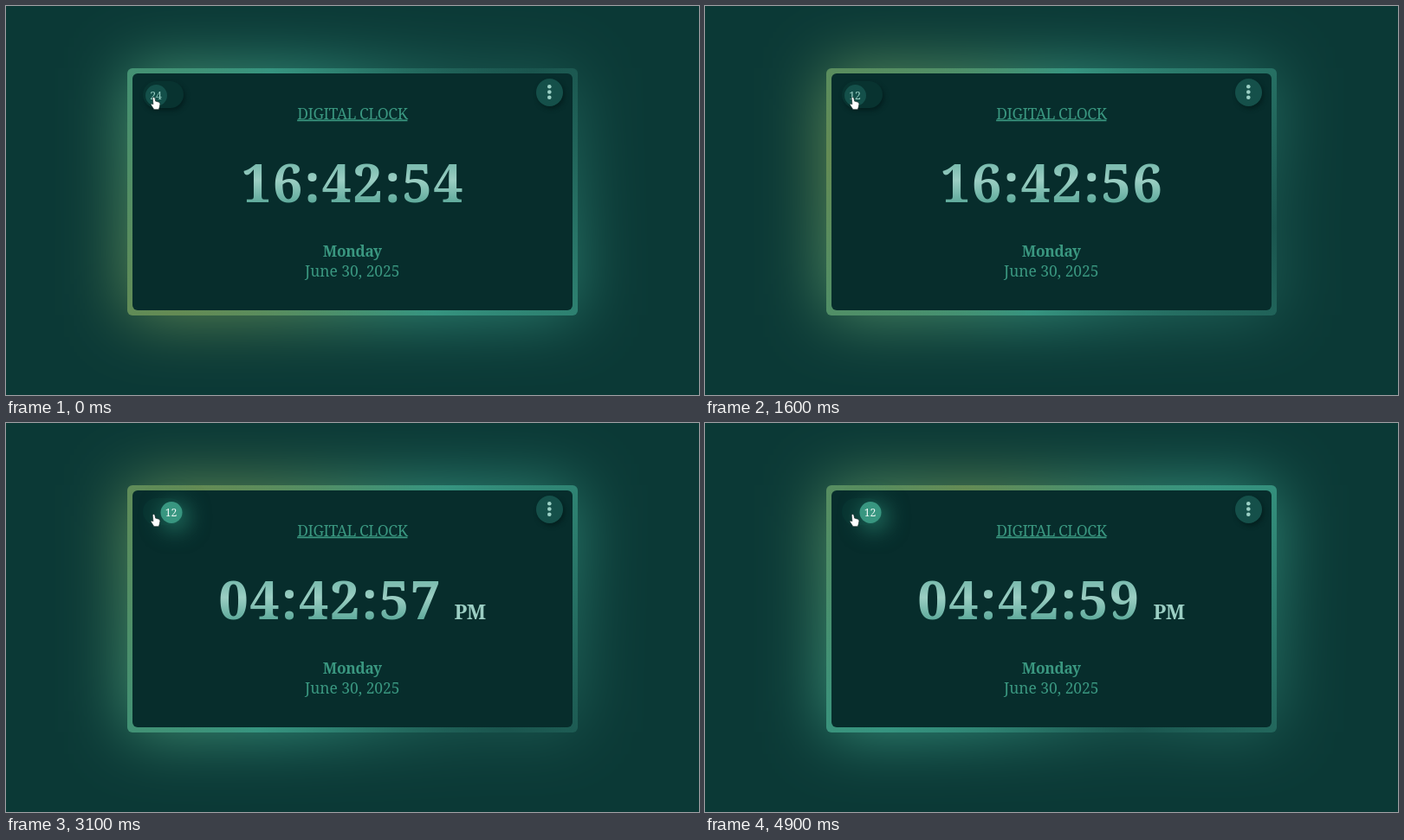
These frames come from a looping animation (800 by 450 pixels, 5 s). An HTML page:

```html
<!DOCTYPE html>
<html lang="en">
<head>
<meta charset="utf-8">
<title>Digital clock</title>
<style>
  html, body { margin: 0; width: 100%; height: 100%; overflow: hidden; background: #0b3936; }
  div, svg { position: absolute; }
  .ring { left: 140px; top: 71.5px; width: 519.5px; height: 286px; border-radius: 6px; }
  /* an opaque surround keeps the blurred edge free of dark bands */
  #glow { filter: blur(38px); box-shadow: 0 0 0 400px #0b3936; border-radius: 0; }
  #panel { left: 146px; top: 77.5px; width: 508px; height: 274.5px; border-radius: 6px; background: #072d2c; }
  #menu { left: 611.5px; top: 83.5px; width: 31px; height: 32px; border-radius: 50%;
    background: #15504a; box-shadow: 2px 3px 5px #04201f; }
  #track { left: 158px; top: 87px; width: 47px; height: 31px; border-radius: 16px; background: #083330; }
  #knob { left: 160.5px; top: 90.5px; width: 25px; height: 25px; border-radius: 50%; }
  svg { left: 0; top: 0; }
  text { font-family: "Noto Serif", serif; fill: #3a9780; text-anchor: middle; }
  .bold { font-weight: 700; }
  #time, #half { text-anchor: start; }
</style>
</head>
<body>
<div class="ring" id="glow"></div>
<div class="ring" id="frame"></div>
<div id="panel"></div>
<div id="menu"></div>
<div id="track"></div>
<div id="knob"></div>
<svg width="800" height="450">
  <defs>
    <linearGradient id="shine" gradientUnits="userSpaceOnUse" x1="0" y1="182" x2="0" y2="229">
      <stop offset="0" stop-color="#78baad"/>
      <stop offset=".42" stop-color="#9bcec3"/>
      <stop offset="1" stop-color="#5ba899"/>
    </linearGradient>
  </defs>
  <text x="399.8" y="130.5" font-size="17.5" letter-spacing="-.45" text-decoration="underline">DIGITAL CLOCK</text>
  <text id="time" class="bold" y="227.3" font-size="61" letter-spacing="2" style="fill:url(#shine)"></text>
  <text id="half" class="bold" x="517.5" y="227" font-size="23.5" letter-spacing="-.8" style="fill:#9bcec3">PM</text>
  <text class="bold" x="399.8" y="290.3" font-size="17.3" letter-spacing="-.3">Monday</text>
  <text x="399.8" y="313" font-size="17.4">June 30, 2025</text>
  <text id="mode" y="107.7" font-size="12.3"></text>
  <g fill="#9bd0c5">
    <circle cx="627.3" cy="93.3" r="2.3"/>
    <circle cx="627.3" cy="99.5" r="2.3"/>
    <circle cx="627.3" cy="105.7" r="2.3"/>
  </g>
  <path d="M169.2 106.4q1.2-1.9 2.6 0l.8 3.7 3.9 1.1q1.6.7 1.4 2.3l-.7 3.6-.9 2.6h-5.4l-1.3-2-2.4-3.6q-.2-1.8 2.7-.4z"
    fill="#fff" stroke="#10211f" stroke-width=".6"/>
</svg>
<script>
  const LOOP = 5000, STEP = 100, FIRST_TICK = 400, CLICK = 1600, SLIDE = 400;
  const $ = id => document.getElementById(id);
  const mix = (a, b, p) => a.map((v, i) => v + (b[i] - v) * p);
  const rgb = c => `rgb(${c.map(Math.round)})`;

  function draw(ms) {
    const t = Math.floor(ms % LOOP / STEP) * STEP;

    // the olive light turns clockwise and slows down
    const angle = 236 + 88 * (1 - (1 - t / (LOOP - STEP)) ** 1.7);
    const light = `conic-gradient(from ${angle}deg, #648b54, #369480 90deg, #1a554e 180deg, #369480 270deg, #648b54)`;
    $('glow').style.background = $('frame').style.background = light;

    const ticks = Math.floor((t - FIRST_TICK) / 1000) + 1;
    const short = ticks > 2;
    $('time').textContent = `${short ? '04' : '16'}:42:${54 + ticks}`;
    $('time').setAttribute('x', short ? 245.5 : 272);
    $('half').style.display = short ? '' : 'none';

    const p = Math.min(1, Math.max(0, (t - CLICK) / SLIDE));
    const on = p * p * (3 - 2 * p);
    const knob = $('knob').style;
    knob.transform = `translateX(${17.5 * on}px)`;
    knob.background = rgb(mix([20, 80, 74], [56, 150, 128], on));
    knob.boxShadow = `4px 5px 24px 4px rgba(48, 145, 122, ${0.65 * on})`;
    $('track').style.boxShadow = `2px 3px 5px rgba(3, 28, 27, ${0.8 * (1 - on)})`;
    $('mode').textContent = t >= CLICK ? '12' : '24';
    $('mode').setAttribute('x', 173 + 17.5 * on);
    $('mode').style.fill = rgb(mix([155, 208, 197], [235, 247, 243], on));
  }

  let start;
  function tick(now) {
    start ??= now;
    draw(now - start);
    requestAnimationFrame(tick);
  }
  draw(0);
  requestAnimationFrame(tick);
</script>
</body>
</html>
```
